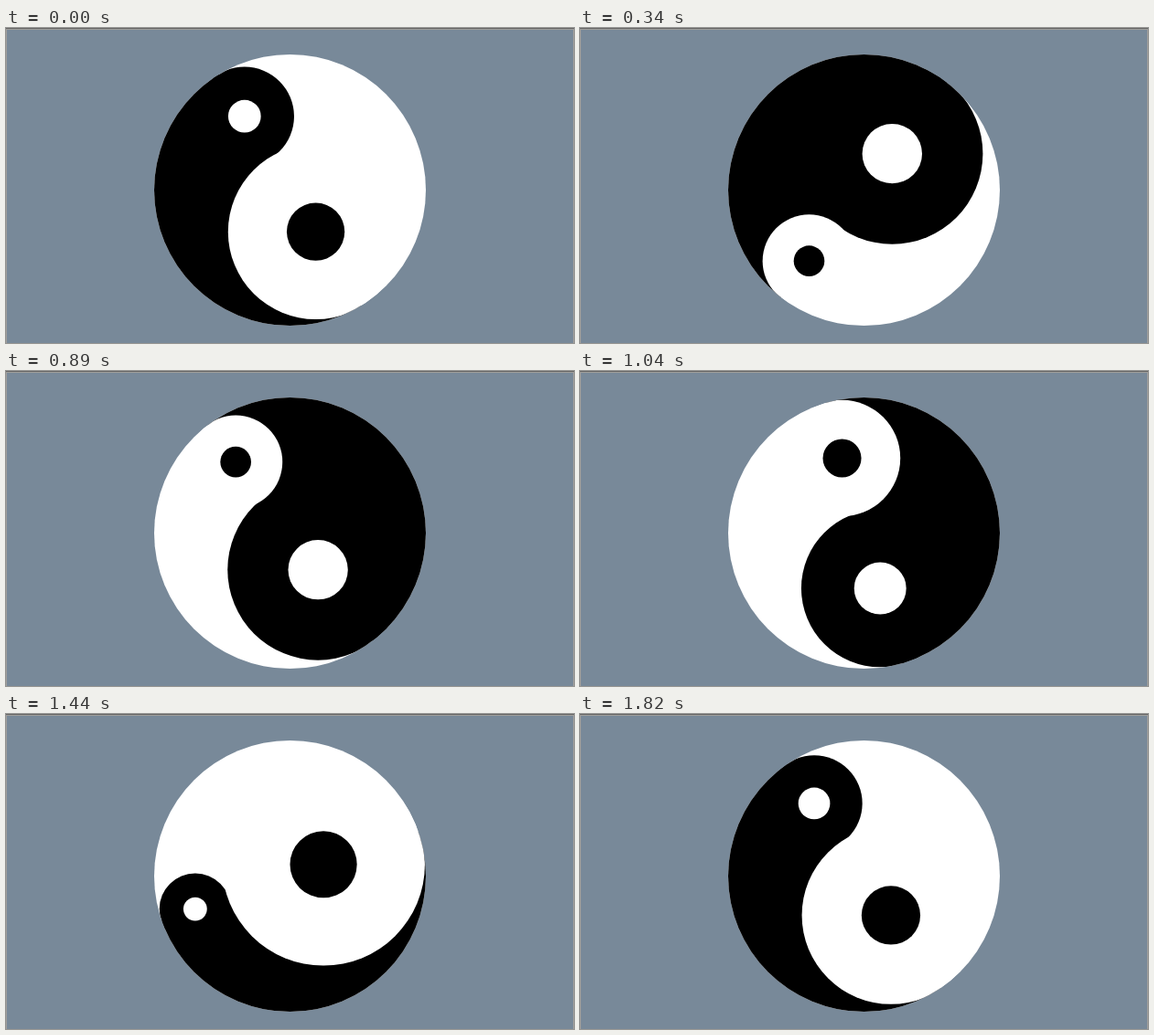
An HTML page with a canvas for the animation above (1.92 s loop, 621 by 345 pixels).

```html
<!DOCTYPE html>
<html lang="en">
<head>
<meta charset="utf-8">
<title>Turning yin and yang</title>
<style>
  html, body { margin: 0; width: 100%; height: 100%; overflow: hidden; background: #788999; }
  canvas { display: block; }
</style>
</head>
<body>
<canvas width="621" height="345"></canvas>
<script>
const ctx = document.querySelector('canvas').getContext('2d');
const W = 621, H = 345, LOOP = 1920, STEP = 50;
const CX = 310.5, CY = 177.5, R = 148.5;
const BLACK = '#000', WHITE = '#fff';

// Key poses: [time in ms, direction of the black lobe in degrees]
const TURN = [
  [0, 238.4], [340, 307.7], [540, 346.7], [890, 412.7],
  [1210, 475.7], [1440, 520.8], [1820, 595.6]
];

// Moves from pose to pose in even jumps of about STEP ms; holds the last pose.
function angleAt(t) {
  const next = TURN.findIndex(([time]) => time > t);
  if (next < 0) return TURN.at(-1)[1] * Math.PI / 180;
  const [t0, a0] = TURN[next - 1], [t1, a1] = TURN[next];
  const jumps = Math.round((t1 - t0) / STEP);
  const part = Math.floor(jumps * (t - t0) / (t1 - t0)) / jumps;
  return (a0 + (a1 - a0) * part) * Math.PI / 180;
}

function disc(x, y, r, color, from = 0, to = 2 * Math.PI) {
  ctx.fillStyle = color;
  ctx.beginPath();
  ctx.arc(x, y, r, from, to);
  ctx.fill();
}

// A lobe reaches the rim from inside and holds a dot a third its size.
function lobe(angle, r, color, dotColor) {
  const x = CX + (R - r) * Math.cos(angle);
  const y = CY + (R - r) * Math.sin(angle);
  disc(x, y, r * 1.01, color);
  disc(x, y, r / 3, dotColor);
}

function background() {
  ctx.fillStyle = '#a09f9c';
  ctx.fillRect(0, 0, W, H);
  ctx.fillStyle = '#788999';
  ctx.fillRect(1, 2, W - 2, H - 2);
  ctx.fillStyle = '#666';
  ctx.fillRect(0, 0, W, 1);
}

function draw(t) {
  const a = angleAt(t);
  // Lobes shrink on the left and grow on the right.
  const r = R / 2 + 38 * Math.cos(a) - 0.7 * Math.cos(3 * a);
  background();
  ctx.save();
  ctx.beginPath();
  ctx.arc(CX, CY, R, 0, 2 * Math.PI);
  ctx.clip();
  disc(CX, CY, 2 * R, WHITE);
  disc(CX, CY, 2 * R, BLACK, a - Math.PI, a);
  lobe(a, r, BLACK, WHITE);
  lobe(a + Math.PI, R - r, WHITE, BLACK);
  ctx.restore();
}

function tick() {
  draw(performance.now() % LOOP);
  requestAnimationFrame(tick);
}
tick();
</script>
</body>
</html>
```
